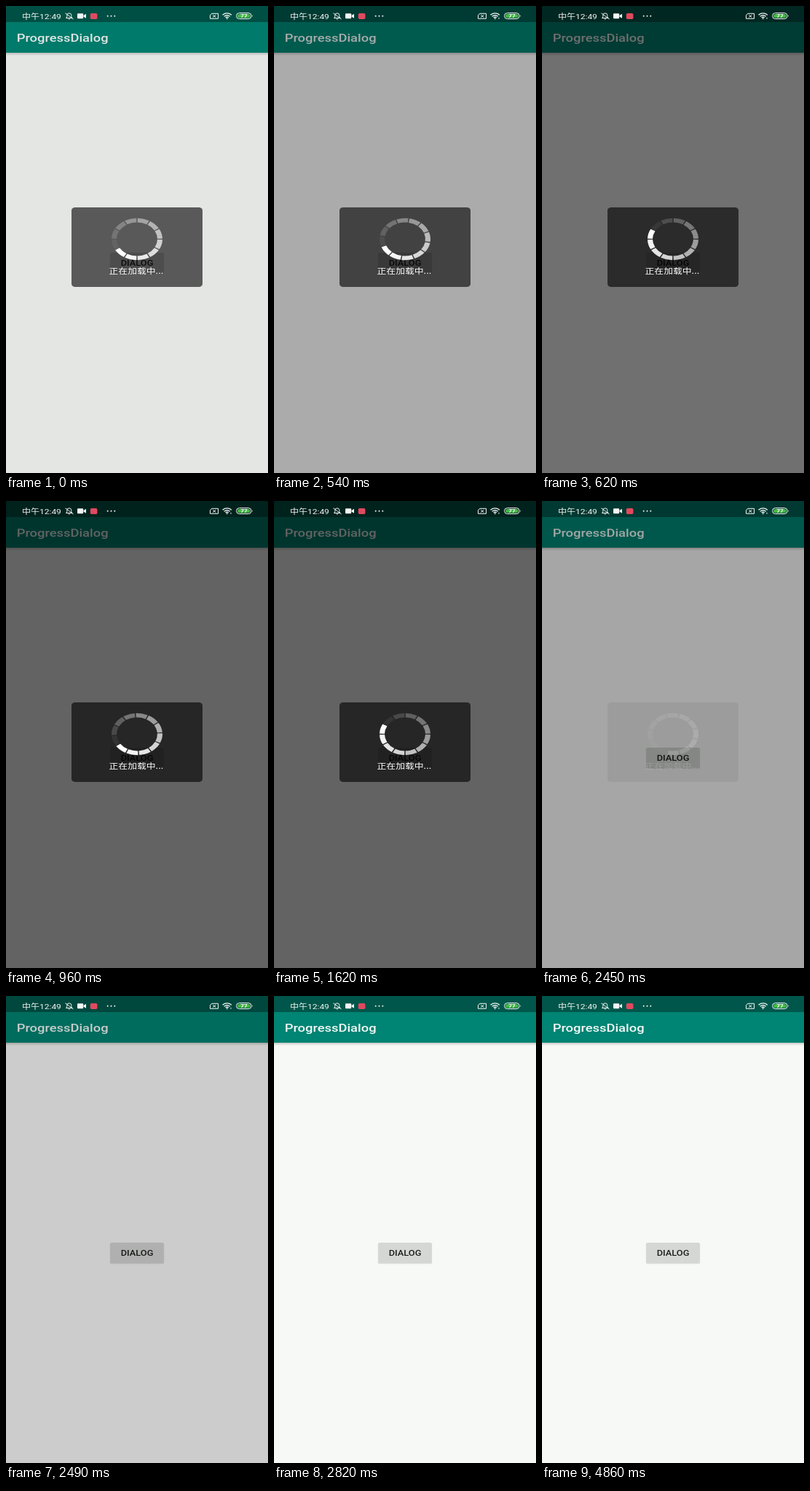
These frames come from a looping animation (360x640 px, 4900 ms). An HTML page:

```html
<!DOCTYPE html>
<html lang="zh">
<head>
<meta charset="utf-8">
<title>ProgressDialog</title>
<style>
  html, body { margin: 0; width: 100%; height: 100%; overflow: hidden; background: #f7f9f7; }
  svg { display: block; width: 360px; height: 640px; }
  text { font-family: Roboto, "Noto Sans CJK SC", "Noto Sans CJK", sans-serif; }
  .line { fill: none; stroke: #f2f7f5; }
</style>
</head>
<body>
<svg viewBox="0 0 360 640">
  <defs>
    <linearGradient id="shade" x2="0" y2="1">
      <stop offset="0" stop-color="#000" stop-opacity=".2"/>
      <stop offset="1" stop-color="#000" stop-opacity="0"/>
    </linearGradient>
  </defs>

  <rect width="360" height="640" fill="#f7f9f7"/>
  <rect y="64" width="360" height="4" fill="url(#shade)"/>
  <rect width="360" height="64" fill="#008473"/>
  <rect width="360" height="22" fill="#00564a"/>
  <!-- Text is set in dp; the tall screen is squeezed into the stage. -->
  <text transform="translate(14.7 49) scale(.917 .752)" font-size="20" font-weight="500" fill="#f3faf8">ProgressDialog</text>

  <rect x="142.8" y="338.5" width="74.4" height="28.8" rx="2" fill="#000" opacity=".1"/>
  <rect x="143.3" y="338" width="73.4" height="28" rx="1.8" ry="1.5" fill="#d5d7d5"/>
  <text transform="translate(180 356) scale(.917 .752)" font-size="14" font-weight="500" text-anchor="middle" fill="#1d1f1d">DIALOG</text>

  <rect id="dim" width="360" height="640"/>

  <g id="dialog">
    <rect x="90" y="276" width="180" height="109" rx="5" ry="4" fill-opacity=".61"/>
    <g transform="translate(180 319.5) scale(1 .8205)"><g id="ring"></g></g>
    <text transform="translate(141.5 367.4) scale(.917 .752)" font-size="14" font-weight="500" fill="#fff">正在加载中...</text>
  </g>

  <g id="status" fill="#f2f7f5">
    <text transform="translate(22 17.8) scale(.917 .752)" font-size="13.1">中午12:49</text>
    <path class="line" d="M82.5 16.5h8.5l-1.2-1.7v-2.3a3 2.6 0 0 0-6 0v2.3zM85.8 18h2M81.5 9.8l11 8.2"/>
    <rect x="98" y="10.3" width="8.2" height="6.9" rx="1"/>
    <path d="M106.5 13l3.5-2.2v6l-3.5-2.2z"/>
    <rect x="115.8" y="10" width="9.6" height="8" rx="1.8" fill="#e2495f"/>
    <circle cx="139.7" cy="13.8" r="1"/>
    <circle cx="144.5" cy="13.8" r="1"/>
    <circle cx="149.3" cy="13.8" r="1"/>

    <path class="line" d="M283 10.3h8.5v7h-11v-4.8zM284.3 12.2l4 3.4M288.3 12.2l-4 3.4"/>
    <path class="line" stroke-width="1.4" d="M297.5 12.2q6.2-4.6 12.4 0M299.6 14.2q4.1-3 8.2 0M301.6 16q2.1-1.4 4.2 0"/>
    <circle cx="303.7" cy="17.3" r=".9"/>
    <rect id="traffic" x="308.2" y="15.8" width="1.6" height="2" opacity=".6"/>
    <rect class="line" x="316.5" y="9.6" width="20.6" height="8" rx="4"/>
    <rect x="318" y="11" width="17.6" height="5.2" rx="2.6" fill="#43b944"/>
    <path d="M338 12q1.4 1.6 0 3.2z"/>
    <text transform="translate(327 16) scale(.917 .752)" font-size="9" font-weight="700" text-anchor="middle" fill="#fff">77</text>
  </g>
</svg>
<script>
const LOOP = 4900, STEP = 1000 / 24, SPIN = 500;
const SHOWN = 491, CLOSED = 2375, DIM_OUT = 2405;
const $ = id => document.getElementById(id);
const clamp = v => Math.min(1, Math.max(0, v));
const easeOut = x => 1 - (1 - clamp(x)) ** 2;

// Twelve ring blades, fading backwards from the head.
for (let i = 0; i < 12; i++) {
  const blade = document.createElementNS("http://www.w3.org/2000/svg", "circle");
  const attrs = {
    r: 31.5, fill: "none", stroke: "#fff", "stroke-width": 7,
    pathLength: 12, "stroke-dasharray": ".91 11.09", "stroke-dashoffset": -.045,
    "stroke-opacity": 1 - (i / 11.6) ** 1.2,
    transform: `rotate(${120 - 30 * i})`
  };
  for (const key in attrs) blade.setAttribute(key, attrs[key]);
  $("ring").append(blade);
}

function draw(t) {
  const n = Math.floor((Math.floor(t / 10) * 10 + 5) * 13 / 540);
  const time = n < 13 ? SHOWN : n * STEP;
  const spun = (Math.min(time, CLOSED) - SHOWN) / SPIN % 1;
  const dim = easeOut((time - SHOWN + 14) / 210) - easeOut((time - DIM_OUT) / 210);

  $("ring").setAttribute("transform", `rotate(${180 * (1 - Math.cos(Math.PI * spun))})`);
  $("dim").setAttribute("opacity", .6 * dim);
  $("dialog").setAttribute("opacity", 1 - clamp((time - CLOSED) / 92));
  $("traffic").setAttribute("visibility", t >= 540 && t < 4860 ? "visible" : "hidden");
}

function tick() {
  draw(performance.now() % LOOP);
  requestAnimationFrame(tick);
}
tick();
</script>
</body>
</html>
```
